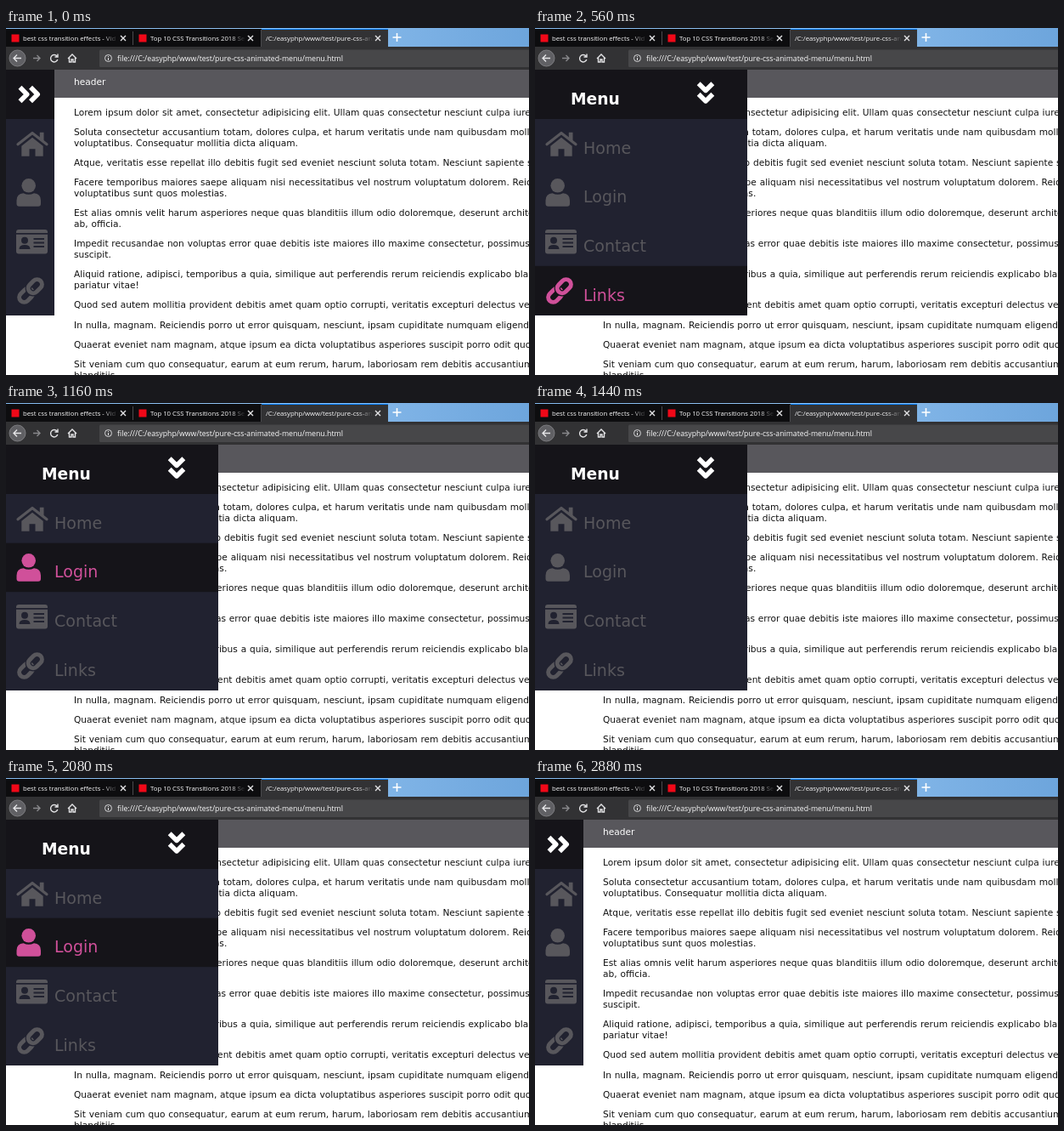
Write an HTML page that moves like this. It is 616 px wide and 408 px high and loops after 2.92 s.

```html
<!DOCTYPE html>
<html lang="en">
<head>
<meta charset="utf-8">
<title>Animated menu</title>
<style>
  html, body { margin: 0; width: 100%; height: 100%; overflow: hidden; background: #fff; }
  svg { display: block; width: 616px; height: 408px; }
  text { white-space: pre; }
  .ui { font-family: "Open Sans", "Noto Sans", sans-serif; fill: #f9f9fa; }
  .tab { font-size: 7.75px; }
  .url { font-size: 8.76px; }
  .page { font: 10.61px "DejaVu Sans", sans-serif; word-spacing: .04em; fill: #111; }
  .label { font: 19px "DejaVu Sans", sans-serif; }
  .title { font: bold 18.7px "DejaVu Sans", sans-serif; fill: #fff; }
  .line { fill: none; stroke: #e4e4e6; stroke-width: 1.4; }
  .item { --bg: #212230; color: #58575c; fill: currentColor; }
  .item.hover { --bg: #151419; color: #d0509a; }
  .back { fill: none; }
  .hover .back, .hole { fill: var(--bg); }
  .ring { fill: none; stroke: currentColor; stroke-width: 5; }
  .halo { fill: none; stroke: var(--bg); stroke-width: 7.4; }
</style>
</head>
<body>
<svg viewBox="0 0 616 408">
  <defs>
    <linearGradient id="sky">
      <stop offset="0" stop-color="#82b9ee"/>
      <stop offset=".5" stop-color="#90c1f0"/>
      <stop offset="1" stop-color="#6da5dc"/>
    </linearGradient>
    <linearGradient id="fadeDark">
      <stop offset="0" stop-color="#0d0d0f" stop-opacity="0"/>
      <stop offset="1" stop-color="#0d0d0f"/>
    </linearGradient>
    <linearGradient id="fadeActive">
      <stop offset="0" stop-color="#323234" stop-opacity="0"/>
      <stop offset="1" stop-color="#323234"/>
    </linearGradient>
    <clipPath id="menuClip"><rect id="menuArea" y="49" width="57" height="289"/></clipPath>
  </defs>

  <rect width="616" height="408" fill="#fff"/>
  <g id="paragraphs" class="page"></g>
  <rect y="49" width="616" height="33" fill="#58575c"/>
  <text class="page" x="80" y="67" style="fill:#fff">header</text>

  <g id="menu" clip-path="url(#menuClip)">
    <rect y="49" width="250" height="289" fill="#212230"/>
    <rect y="49" width="250" height="58" fill="#151419"/>
    <text class="title openOnly" x="42" y="90">Menu</text>
    <path id="chevrons" fill="none" stroke="#fff" stroke-width="5.6" stroke-linejoin="round"
      d="M-10.5-8.300L-2.300 0L-10.500 8.300M2-8.300L10.200 0L2 8.300"/>
    <g id="items"></g>
  </g>

  <rect width="616" height="22" fill="url(#sky)"/>
  <rect y="1" width="301" height="21" fill="#0d0d0f"/>
  <path d="M455.500 11H465.500M460.500 6V16" stroke="#fff" stroke-width="1.6"/>
  <rect x="301" y="1" width="149" height="21" fill="#323234"/>
  <rect x="301" y="1" width="149" height="1" fill="#0a84ff"/>
  <path d="M149.500 4V20M300.500 2V22" stroke="#4a4a4d"/>
  <g id="tabs"></g>
  <rect y="22" width="616" height="27" fill="#323234"/>
  <rect x="110" y="25.500" width="510" height="20.500" rx="1.500" fill="#474749"/>
  <circle cx="13.500" cy="35.500" r="9.500" fill="#606064" stroke="#88888c" stroke-width=".8"/>
  <path class="line" d="M18 35.500H9M13 31.500L9 35.500L13 39.500"/>
  <path class="line" style="stroke:#88888b" d="M32 35.500H40M36.500 32L40 35.500L36.500 39"/>
  <path class="line" d="M60 33A4.200 4.200 0 1 0 60.800 37M61 30.500V34H57.500"/>
  <path class="line" d="M73 36L78 31L83 36M74.500 35V40H77V37H79V40H81.500V35"/>
  <circle class="line" cx="120.500" cy="35.500" r="4" style="stroke-width:.9"/>
  <path class="line" style="stroke-width:1" d="M120.500 33V34M120.500 35V38"/>
  <text class="ui url" x="131" y="38.800">file:///C:/easyphp/www/test/pure-css-animated-menu/menu.html</text>
</svg>

<script>
const LOOP = 2920, STEP = 40;
const OPEN_AT = 100, CLOSE_AT = 2356, SLIDE = 320;
const CLOSED_WIDTH = 57, OPEN_WIDTH = 250, ITEM_HEIGHT = 57.6;
const byId = id => document.getElementById(id);

const tabs = [
  { x: 0, title: 'best css transition effects - Vid', icon: true, fade: 'fadeDark' },
  { x: 150, title: 'Top 10 CSS Transitions 2018 Se', icon: true, fade: 'fadeDark' },
  { x: 300, title: '/C:/easyphp/www/test/pure-css-an', fade: 'fadeActive' }
];

const paragraphs = [
  ['Lorem ipsum dolor sit amet, consectetur adipisicing elit. Ullam quas consectetur nesciunt culpa iure'],
  ['Soluta consectetur accusantium totam, dolores culpa, et harum veritatis unde nam quibusdam mollitia',
   'voluptatibus. Consequatur mollitia dicta aliquam.'],
  ['Atque, veritatis esse repellat illo debitis fugit sed eveniet nesciunt soluta totam. Nesciunt sapiente sit'],
  ['Facere temporibus maiores saepe aliquam nisi necessitatibus vel nostrum voluptatum dolorem. Reiciendis',
   'voluptatibus sunt quos molestias.'],
  ['Est alias omnis velit harum asperiores neque quas blanditiis illum odio doloremque, deserunt architecto',
   'ab, officia.'],
  ['Impedit recusandae non voluptas error quae debitis iste maiores illo maxime consectetur, possimus',
   'suscipit.'],
  ['Aliquid ratione, adipisci, temporibus a quia, similique aut perferendis rerum reiciendis explicabo blanditiis',
   'pariatur vitae!'],
  ['Quod sed autem mollitia provident debitis amet quam optio corrupti, veritatis excepturi delectus vero'],
  ['In nulla, magnam. Reiciendis porro ut error quisquam, nesciunt, ipsam cupiditate numquam eligendi'],
  ['Quaerat eveniet nam magnam, atque ipsum ea dicta voluptatibus asperiores suscipit porro odit quos'],
  ['Sit veniam cum quo consequatur, earum at eum rerum, harum, laboriosam rem debitis accusantium',
   'blanditiis.']
];

const ring = (x, cls) =>
  `<rect class="${cls}" x="${x - 9}" y="-5.8" width="18" height="11.6" rx="5.8"/>`;

// Icons are drawn relative to the top of their row.
const items = [
  ['Home', `<path d="M14 30.500L31 17.200L48 30.500" fill="none" stroke="currentColor" stroke-width="3.200"
      stroke-linecap="round" stroke-linejoin="round"/>
    <path d="M39.800 16.500H44.500V28L39.800 24.500ZM31 22.500L43.700 32.500V44.500H34.500V36H27.500V44.500H18.300V32.500Z"/>`],
  ['Login', `<circle cx="26.700" cy="21.500" r="8.300"/>
    <path d="M12.500 43V39Q12.500 31 20.500 30.500Q26.700 33.500 33 30.500Q41 31 41 39V43Q41 46 38 46H15.500Q12.500 46 12.500 43Z"/>`],
  ['Contact', `<rect x="12" y="15.500" width="37" height="28.500" rx="3"/>
    <path class="hole" d="M12 19.500H49V21.300H12ZM32.500 25.500H45V27.500H32.500ZM32.500 30H45V32H32.500ZM32.500 34.500H45V36.500H32.500ZM15.500 38.500Q15.500 33.500 22 33.500Q28.500 33.500 28.500 38.500Z"/>
    <circle class="hole" cx="22" cy="28.300" r="4"/>`],
  ['Links', `<g transform="translate(29 30) rotate(-45)">
    ${ring(-7.5, 'ring')}${ring(7.5, 'halo')}${ring(7.5, 'ring')}</g>`]
];

// Pointer path: [time, hovered row], -1 for none.
const hovers = [
  [0, -1], [320, 0], [400, 1], [460, 2], [520, 3], [760, 2], [960, 1], [1200, 0], [1340, -1],
  [1500, 0], [1600, 1], [1700, 2], [1800, 3], [1920, 2], [2020, 1], [2140, 0], [2260, -1]
];

function buildTabs() {
  byId('tabs').innerHTML = tabs.map(({ x, title, icon, fade }) => `
    ${icon ? `<rect x="${x + 6.5}" y="7.500" width="9" height="9" fill="#f00818"/>` : ''}
    <text class="ui tab" x="${x + (icon ? 20 : 6)}" y="15">${title}</text>
    <rect x="${x + 114}" y="3" width="18" height="18" fill="url(#${fade})"/>
    <rect x="${x + 131}" y="3" width="17" height="18" fill="${icon ? '#0d0d0f' : '#323234'}"/>
    <path class="line" d="M${x + 135} 9L${x + 141} 15M${x + 141} 9L${x + 135} 15"/>`).join('');
}

function buildParagraphs() {
  let y = 102.8, html = '';
  for (const lines of paragraphs) {
    for (const line of lines) {
      html += `<text x="80" y="${y}">${line}</text>`;
      y += 12.7;
    }
    y += 10.6;
  }
  byId('paragraphs').innerHTML = html;
}

function buildItems() {
  byId('items').innerHTML = items.map(([label, icon], i) => `
    <g class="item" transform="translate(0 ${106.2 + i * ITEM_HEIGHT})">
      <rect class="back" y=".8" width="250" height="${ITEM_HEIGHT}"/>
      ${icon}<text class="label openOnly" x="57" y="41.700">${label}</text>
    </g>`).join('');
}

// CSS "ease" curve: cubic-bezier(.25, .1, .25, 1)
function ease(x) {
  if (x <= 0) return 0;
  if (x >= 1) return 1;
  let low = 0, high = 1;
  for (let i = 0; i < 20; i++) {
    const s = (low + high) / 2;
    if (0.75 * s * (1 - s) + s ** 3 < x) low = s; else high = s;
  }
  return 0.3 * low * (1 - low) ** 2 + 3 * (1 - low) * low ** 2 + low ** 3;
}

buildTabs();
buildParagraphs();
buildItems();
const rows = document.querySelectorAll('.item');
const openOnly = document.querySelectorAll('.openOnly');

function draw(time) {
  const p = ease((time - OPEN_AT) / SLIDE) - ease((time - CLOSE_AT) / SLIDE);
  const isOpen = time > OPEN_AT && time < CLOSE_AT;
  const hovered = hovers.filter(([start]) => start <= time).pop()[1];
  const bend = p * (1 - p);

  byId('menuArea').setAttribute('width', CLOSED_WIDTH + (OPEN_WIDTH - CLOSED_WIDTH) * p);
  byId('chevrons').setAttribute('transform',
    `translate(${27 + 174 * p + 37 * bend} ${78 - 2.3 * p - 8 * bend}) rotate(${90 * p + 50 * bend})`);
  openOnly.forEach(el => { el.style.display = isOpen ? '' : 'none'; });
  rows.forEach((row, i) => row.classList.toggle('hover', i === hovered));
}

const start = performance.now();
function tick() {
  const elapsed = (performance.now() - start) % LOOP;
  draw(Math.floor(elapsed / STEP) * STEP);
  requestAnimationFrame(tick);
}
tick();
</script>
</body>
</html>
```
